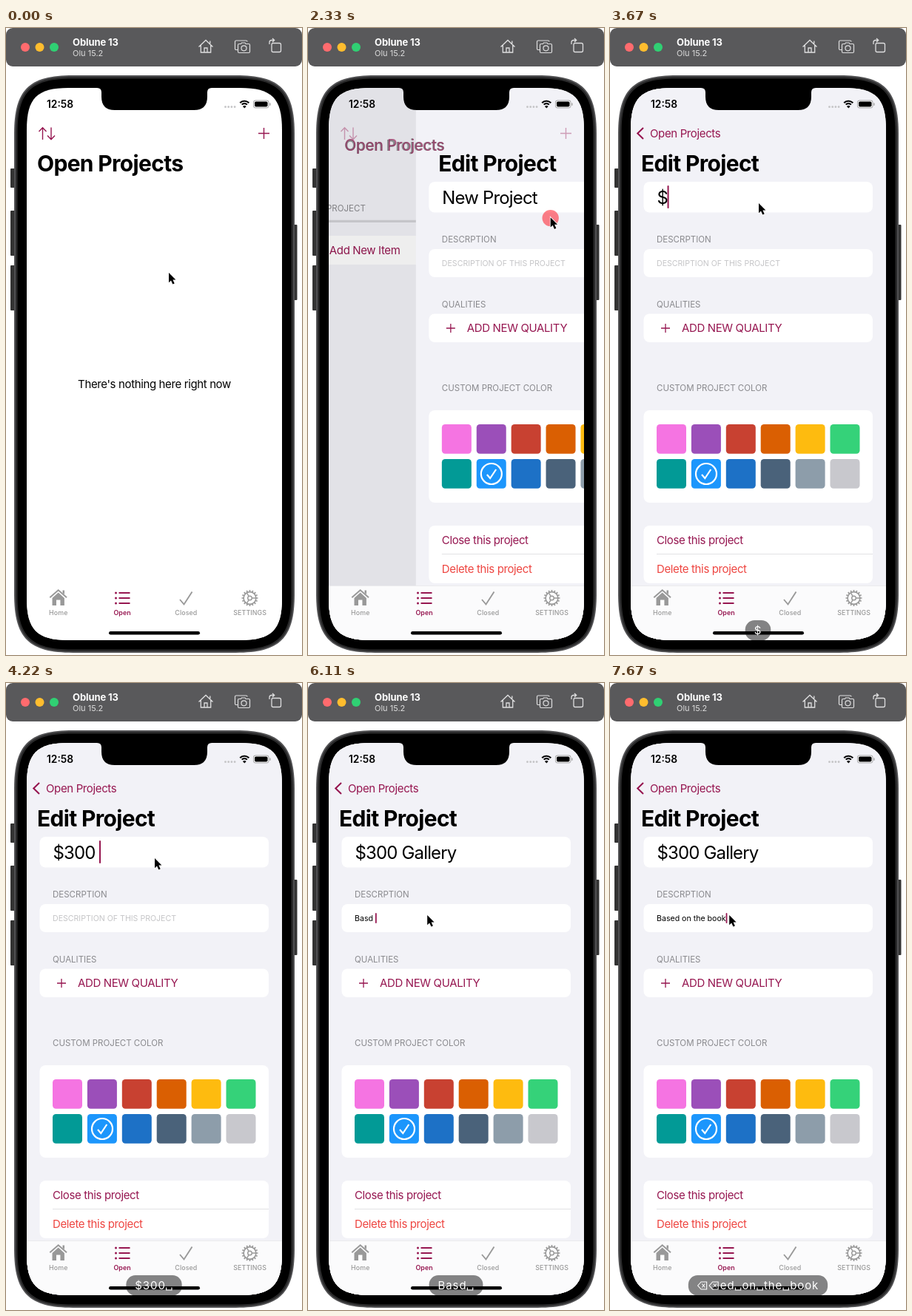
Animation of 400x848 px, one loop 8 s. Source, as an HTML page with a canvas:

```html
<!DOCTYPE html>
<html lang="en">
<head>
<meta charset="utf-8">
<title>Editing a project</title>
<style>
html, body { margin: 0; width: 100%; height: 100%; overflow: hidden; background: #fff; }
canvas { display: block; width: 400px; height: 848px; }
</style>
</head>
<body>
<canvas id="stage"></canvas>
<script>
const LOOP = 8000, STEP = 1000 / 9;
const ACCENT = '#961650', GRAY = '#8a8a8e', PAGE = '#f2f2f7', TAB_GRAY = '#999';
const SWATCHES = ['#f574e2', '#9b4fb9', '#c84131', '#da5f02', '#febb0f', '#35d279',
                  '#029a96', '#1c96fc', '#1d71c6', '#4a627a', '#8d9daa', '#c8c8cd'];

const canvas = document.getElementById('stage');
const ctx = canvas.getContext('2d');
const dpr = window.devicePixelRatio || 1;
canvas.width = 400 * dpr;
canvas.height = 848 * dpr;

// ---- helpers ----
const clamp = v => Math.max(0, Math.min(1, v));
const mix = (a, b, p) => a + (b - a) * p;
const smooth = p => p * p * (3 - 2 * p);

function box(x, y, w, h, r, fill) {
  ctx.beginPath();
  ctx.roundRect(x, y, w, h, r);
  ctx.fillStyle = fill;
  ctx.fill();
}
// rounded rectangle whose corners ease into the sides
function squircle(x, y, w, h, r) {
  const far = 1.35 * r, near = 0.331 * r, p = new Path2D();
  const R = x + w, B = y + h;
  p.moveTo(x, y + far);
  p.bezierCurveTo(x, y + near, x + near, y, x + far, y);
  p.lineTo(R - far, y);
  p.bezierCurveTo(R - near, y, R, y + near, R, y + far);
  p.lineTo(R, B - far);
  p.bezierCurveTo(R, B - near, R - near, B, R - far, B);
  p.lineTo(x + far, B);
  p.bezierCurveTo(x + near, B, x, B - near, x, B - far);
  p.closePath();
  return p;
}
function dot(x, y, r, fill) {
  ctx.beginPath();
  ctx.arc(x, y, r, 0, 7);
  ctx.fillStyle = fill;
  ctx.fill();
}
function ring(x, y, r, color, width) {
  ctx.beginPath();
  ctx.arc(x, y, r, 0, Math.PI * 2);
  ctx.strokeStyle = color;
  ctx.lineWidth = width;
  ctx.stroke();
}
function shape(d, fill) {
  ctx.fillStyle = fill;
  ctx.fill(new Path2D(d));
}
function line(d, color, width) {
  ctx.strokeStyle = color;
  ctx.lineWidth = width;
  ctx.stroke(new Path2D(d));
}
function setFont(size, weight = 400, spacing = 0) {
  ctx.font = `${weight} ${size}px Inter, "DejaVu Sans", sans-serif`;
  ctx.letterSpacing = spacing + 'px';
}
// y is the middle of the capital letters; returns the width
function text(s, x, y, size, color, weight, spacing, align = 'left') {
  setFont(size, weight, spacing);
  ctx.textAlign = align;
  ctx.fillStyle = color;
  ctx.fillText(s, x, y + size * 0.364);
  return ctx.measureText(s).width;
}
const heading = (s, x, y) => text(s, x, y, 30, '#000', 700, -0.68);
const body = (s, x, y, color) => text(s, x, y, 15, color, 400, -0.37);
const caption = (s, y) => text(s, 63, y, 11.5, GRAY);
function layer(alpha, dx, draw) {
  ctx.save();
  ctx.globalAlpha *= alpha;
  ctx.translate(dx, 0);
  draw();
  ctx.restore();
}

// ---- typing ----
const run = (keys, times, from, gap) => {
  const at = [...keys].map((k, i) => i < times.length ? times[i] : from + gap * (i - times.length));
  return { keys: [...keys], at, start: at[0], end: at[at.length - 1] };
};
const RUNS = [
  run('$300 Gallery', [3650, 3770, 3880, 3990, 4210], 4325, 70),
  run('Basd ', [5710, 5760, 5880, 5990, 6100]),
  run('⌫⌫ed on the book', [6430, 6540, 6650, 6760, 6980, 6996], 7050, 66),
];
const pressed = (r, t) => r.keys.filter((k, i) => r.at[i] <= t);
// a field shows each key slightly after it is pressed
const typed = (runs, t) => runs.flatMap(r => pressed(r, t - 8))
  .reduce((s, k) => k === '⌫' ? s.slice(0, -1) : s + k, '');

// ---- pointer ----
const PATH = [[330, 220, 331], [780, 347.5, 141], [1111, 347.5, 141], [2000, 327.7, 256.3],
              [2400, 327.7, 256.3], [2778, 201, 237], [4890, 201, 237], [5222, 161.2, 314]];
const CLICKS = [[780, 990], [2000, 2220], [2890, 3300], [5222, 5340]];

function pointerAt(t) {
  const i = PATH.findIndex(k => k[0] > t);
  if (i === 0) return PATH[0].slice(1);
  if (i < 0) return PATH[PATH.length - 1].slice(1);
  const [a, b] = [PATH[i - 1], PATH[i]];
  const p = smooth((t - a[0]) / (b[0] - a[0]));
  return [mix(a[1], b[1], p), mix(a[2], b[2], p)];
}
function pointer(t) {
  const [x, y] = pointerAt(t);
  for (const [down, up] of CLICKS) {
    if (t >= down && t < up) dot(x, y + 0.8, 20.5, 'rgba(255,30,42,.56)');
    if (t >= down && t < up + 120) dot(x, y + 0.8, 11.2, 'rgba(255,30,42,.56)');
  }
  ctx.save();
  ctx.translate(x, y);
  const arrow = 'M0 0V13.2L3 10.4L5.3 15.6L7.7 14.5L5.4 9.5H9.4Z';
  line(arrow, '#fff', 1.6);
  shape(arrow, '#000');
  ctx.restore();
}

// ---- device ----
function windowBar() {
  box(0, 0, 400, 52, 9, '#59595b');
  dot(26, 26, 6, '#ff6b6e');
  dot(45.5, 26, 6, '#ffbd2e');
  dot(65, 26, 6, '#30d073');
  text('Oblune 13', 90, 19, 13, '#fff', 700, -0.1);
  text('Olu 15.2', 90, 34, 11, '#dcdcdc');
  const c = '#dededf';
  line('M260.5 25.5L270 16.5L279.5 25.5M263.3 23.5V33H276.7V23.5M268 33V27H272V33M275.8 21V17.5', c, 1.3);
  line('M313 29.5H311a1.5 1.5 0 0 1-1.5-1.5V18.5a1.5 1.5 0 0 1 1.5-1.5H324.5a1.5 1.5 0 0 1 1.5 1.5', c, 1.2);
  line('M315.5 21.5H317.5L318.5 20H323L324 21.5H328a1.5 1.5 0 0 1 1.5 1.5V32a1.5 1.5 0 0 1-1.5 1.5H315a1.5 1.5 0 0 1-1.5-1.5V23a1.5 1.5 0 0 1 1.5-1.5Z', c, 1.2);
  ring(321.5, 27.3, 3.5, c, 1.2);
  line('M361 20.5H369.5a2 2 0 0 1 2 2V30.5a2 2 0 0 1-2 2H361a2 2 0 0 1-2-2V22.5a2 2 0 0 1 2-2ZM356 22V19.5a3 3 0 0 1 3-3H362.5M360 14L362.7 16.5L360 19', c, 1.3);
}
function phone() {
  for (const [x, y, h] of [[6, 190, 26], [6, 247, 61], [6, 321, 61], [387.5, 266, 102]]) box(x, y, 6, h, 1, '#333');
  [['#505052', 0], ['#2a2a2b', 2], ['#000', 4.5]].forEach(([color, inset]) => {
    ctx.fillStyle = color;
    ctx.fill(squircle(11 + inset, 64 + inset, 379 - 2 * inset, 781 - 2 * inset, 59 - inset));
  });
}
function statusBar() {
  text('12:58', 55, 103.3, 13.8, '#000', 600);
  for (let i = 0; i < 4; i++) dot(296.5 + i * 4.2, 106.7, 1.4, '#c4c4c6');
  for (const r of [8.3, 4.9]) {
    ctx.beginPath();
    ctx.arc(322.3, 107, r, -Math.PI * 0.76, -Math.PI * 0.24);
    ctx.strokeStyle = '#000';
    ctx.lineWidth = 2.1;
    ctx.stroke();
  }
  shape('M322.3 108.5L319.9 106Q322.3 104 324.7 106Z', '#000');
  box(334, 97.5, 21.5, 11, 3.4, '#a5a5a7');
  box(335, 98.5, 19.5, 9, 2.5, '#fff');
  box(336, 99.5, 17.5, 7, 1.8, '#000');
  box(356.2, 101.3, 1.4, 3.6, 0.7, '#a5a5a7');
}
function tabBar(tint) {
  box(28, 754, 345, 75, 0, '#fff');
  layer(tint, 0, () => {
    box(28, 754, 345, 75, 0, '#fbfbfc');
    box(28, 754, 345, 0.6, 0, '#dcdce0');
  });
  line('M59.3 770.3L70.7 760.3L82 770.3', TAB_GRAY, 2);
  shape('M62.5 771L70.7 763.5L78.9 771V781H62.5ZM76.5 760.5H79V766L76.5 764Z', TAB_GRAY);
  box(68, 773.5, 5.4, 7.5, 0, '#fff');
  for (const y of [764, 771, 778]) {
    dot(148.5, y, 1.5, ACCENT);
    line(`M152.5 ${y}H167.5`, ACCENT, 1.8);
  }
  line('M235 773L240.5 779.5L251.5 762.5', TAB_GRAY, 1.9);
  ring(329.5, 771, 8.4, TAB_GRAY, 1.6);
  ring(329.5, 771, 2.8, TAB_GRAY, 1.4);
  for (let i = 0; i < 16; i++) {
    ctx.save();
    ctx.translate(329.5, 771);
    ctx.rotate(i * Math.PI / 8);
    line('M0 -8V-11', TAB_GRAY, 1.7);
    ctx.restore();
  }
  line('M332.3 771H338M328.1 768.6L325.3 763.7M328.1 773.4L325.3 778.3', TAB_GRAY, 1.4);
  ['Home', 'Open', 'Closed', 'SETTINGS'].forEach((s, i) =>
    text(s, 70.8 + 86.3 * i, 791, 8.85, i === 1 ? ACCENT : TAB_GRAY, i === 1 ? 600 : 500, 0.1, 'center'));
}
function notch() {
  shape('M123 80V81Q129 81 129 87V93Q129 111 147 111H254Q272 111 272 93V87Q272 81 278 81V80Z', '#000');
}

// ---- screens ----
const plus = (x, y, r, w) => line(`M${x - r} ${y}h${2 * r}M${x} ${y - r}v${2 * r}`, ACCENT, w);

function listScreen() {
  box(28, 81, 345, 747, 0, PAGE);
  caption('NEW PROJECT', 244);
  box(63, 259.7, 248, 3.2, 1.6, '#d3d3d7');
  line('M328 247H323.5a2 2 0 0 0-2 2V258.5a2 2 0 0 0 2 2H333a2 2 0 0 0 2-2V253.5M326.5 255.5L336 246', ACCENT, 1.4);
  box(45.5, 281, 310, 39, 8, '#fff');
  plus(75, 300.5, 6, 1.3);
  body('Add New Item', 97, 301, ACCENT);
}
function menu(x, y, w, tip, items) {
  box(x, y, w, 36, 8, '#2a2a2c');
  shape(`M${tip - 9} ${y + 35.5}h18l-9 9z`, '#2a2a2c');
  setFont(12.4);
  const widths = items.map(s => ctx.measureText(s).width);
  const pad = (w - widths.reduce((a, b) => a + b)) / items.length;
  items.forEach((s, i) => {
    if (i) box(x, y, 0.8, 36, 0, '#68686c');
    text(s, x + pad / 2, y + 18, 12.4, '#fff');
    x += widths[i] + pad;
  });
}
function titleField(t) {
  box(45.5, 208, 309.5, 41.5, 8, '#fff');
  const s = typed(RUNS.slice(0, 1), t) || 'New Project';
  const end = 63 + text(s, 63.5, 229, 24, '#000', 400, -0.85);
  if (t >= 3222 && t < 3650) {
    layer(0.2, 0, () => box(63, 213, end - 63, 31, 0, ACCENT));
    for (const [x, y] of [[63, 211], [end, 246]]) {
      box(x - 1, 213, 2, 31, 0, ACCENT);
      dot(x, y, 4, ACCENT);
    }
  } else if (t >= 2890 && t < 5300) {
    box(end, 213, 2, 31, 1, ACCENT);
  }
}
function notesField(t) {
  box(45.5, 299, 309.5, 38, 8, '#fff');
  const s = typed(RUNS.slice(1), t);
  const w = text(s || 'DESCRIPTION OF THIS PROJECT', 63, 318, 10.6, s ? '#000' : '#c5c5c7');
  if (t >= 5300) box(63 + (s ? w : 0), 311, 1.8, 14, 0.9, ACCENT);
}
function editScreen(t) {
  box(28, 81, 345, 747, 0, PAGE);
  titleField(t);
  caption('DESCRPTION', 285.8);
  notesField(t);
  caption('QUALITIES', 373.6);
  box(45.5, 386.5, 309.5, 38.5, 8, '#fff');
  plus(75, 406, 6, 1.3);
  body('ADD NEW QUALITY', 97, 406, ACCENT);
  caption('CUSTOM PROJECT COLOR', 486.6);
  box(45.5, 517, 309.5, 125, 8, '#fff');
  SWATCHES.forEach((c, i) => box(63 + i % 6 * 46.9, i < 6 ? 536 : 583, 40, 39.7, 4.5, c));
  ring(130, 603, 14, '#fff', 2.2);
  line('M124 604L128.3 609L136.3 597', '#fff', 2.2);
  box(45.5, 673, 309.5, 78, 8, '#fff');
  box(63, 711, 292, 0.8, 0, '#d9d9dc');
  body('Close this project', 63, 693, ACCENT);
  body('Delete this project', 63, 732, '#ee4540');
}

function navigation(p) {
  layer(1 - p, 0, () => {
    line('M49.5 151V135M44.5 140L49.5 134.7L54.5 140M61 134.5V150.5M56 145.5L61 150.8L66 145.5', ACCENT, 1.4);
    plus(348.5, 142.5, 7.5, 1.4);
  });
  layer(clamp(p * 3 - 2), 0, () => line('M45 135L37.3 142.5L45 150', ACCENT, 2.1));

  // the large title shrinks into the back button
  const morph = (alpha, scale, draw) => layer(alpha, 0, () => {
    ctx.translate(mix(42, 54, p), mix(183, 142.5, p));
    ctx.scale(scale, scale);
    draw();
  });
  morph(1 - p, mix(1, 0.483, p), () => heading('Open Projects', 0, 0));
  morph(p, mix(2.07, 1, p), () => body('Open Projects', 0, 0, ACCENT));
  if (p > 0) heading('Edit Project', 42 + 345 * (1 - p), 183);
}

// ---- keystroke display ----
function keystrokes(t) {
  RUNS.forEach((r, n) => {
    if (t < r.start || t > r.end + 1300) return;
    const keys = pressed(r, t);
    const next = RUNS[n + 1];
    const y = next && t >= next.start ? 767 : 801;
    setFont(15);
    const widths = keys.map(k => (k === '⌫' ? 14.6 : k === ' ' ? 9 : ctx.measureText(k).width) + 0.9);
    const w = widths.reduce((a, b) => a + b) + 24;
    let x = 200 - w / 2;
    layer(1 - clamp((t - r.end - 1000) / 300), 0, () => {
      box(x, y, w, 27.5, 12.5, 'rgba(0,0,0,.48)');
      x += 12;
      keys.forEach((k, i) => {
        if (k === '⌫') {
          line(`M${x + 0.8} ${y + 14}l4.5-5h7.5v10h-7.5zM${x + 6.5} ${y + 11.5}l4 5m0-5l-4 5`, '#fff', 1.1);
        } else if (k === ' ') {
          line(`M${x + 0.8} ${y + 16.5}v3.5h7.4v-3.5`, '#fff', 1.2);
        } else {
          text(k, x, y + 14, 15, '#fff');
        }
        x += widths[i];
      });
    });
  });
}

// ---- scene ----
function spring(ms) {
  const s = 0.0147 * Math.max(0, ms);
  const p = 1 - (1 + s) * Math.exp(-s);
  return p > 0.998 ? 1 : p;
}

function draw(t) {
  ctx.setTransform(dpr, 0, 0, dpr, 0, 0);
  box(0, 0, 400, 848, 0, '#fff');
  windowBar();
  phone();

  const listed = clamp((t - 950) / 300);
  const push = spring(t - 2180);

  ctx.save();
  ctx.clip(squircle(28, 81, 345, 747, 42));
  box(28, 81, 345, 747, 0, '#fff');
  layer(1 - listed, 0, () =>
    text("There's nothing here right now", 200.5, 481.5, 15, '#000', 400, -0.37, 'center'));
  layer(listed, -103.5 * push, listScreen);
  if (push > 0) {
    box(28, 81, 345, 747, 0, `rgba(0,0,0,${0.1 * push})`);
    layer(1, 345 * (1 - push), () => editScreen(t));
  }
  navigation(spring(t - 2193));
  if (t >= 3320 && t < 3650) menu(36, 166, 304, 127, ['Cut', 'Copy', 'Paste', 'Look Up', 'Translate']);
  if (t >= 6430 && t < 6650) menu(38, 262, 76, 76, ['Based']);
  statusBar();
  tabBar(listed);
  ctx.restore();

  box(139, 816, 123, 4.6, 2.3, '#000');
  notch();
  keystrokes(t);
  pointer(t);
}

function tick(now) {
  draw(Math.floor((now % LOOP + 4) / STEP) * STEP);
  requestAnimationFrame(tick);
}
requestAnimationFrame(tick);
</script>
</body>
</html>
```
